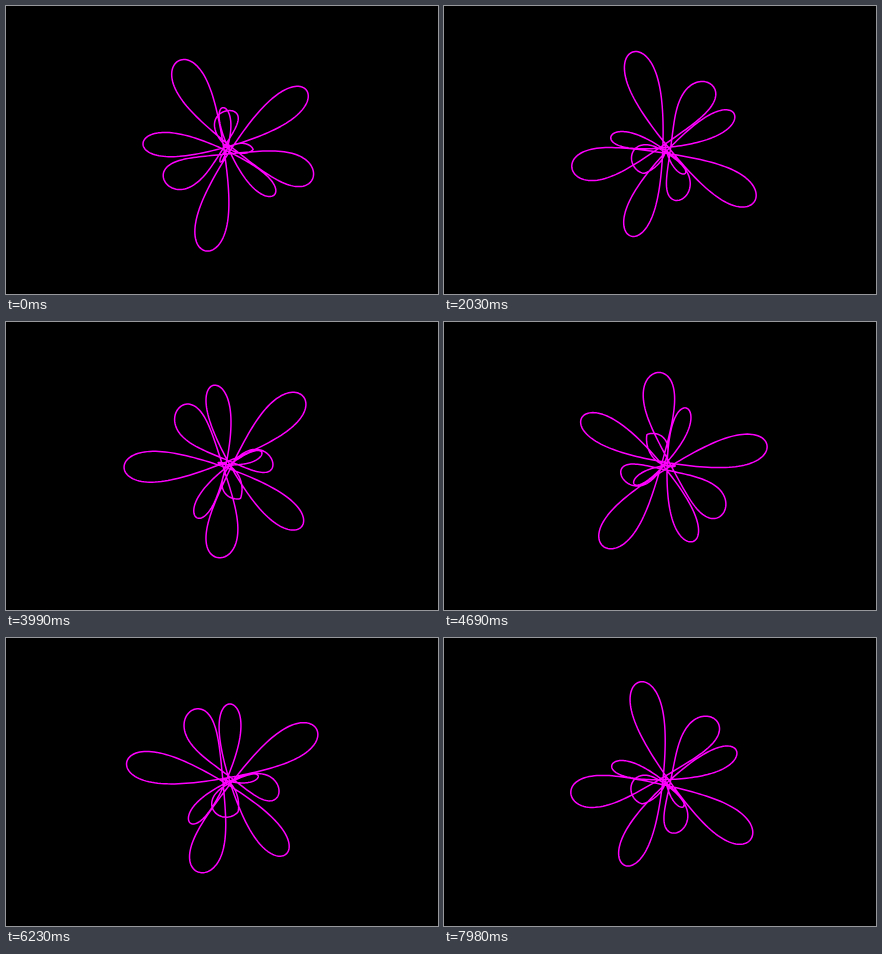
Write an HTML page with a canvas that moves like this. It is 432x288 px and loops after 8000 ms.

```html
<!DOCTYPE html>
<html>
<head>
<meta charset="utf-8">
<style>
  html, body { margin: 0; height: 100%; overflow: hidden; background: #000; }
  canvas { display: block; width: 432px; height: 288px; }
</style>
</head>
<body>
<canvas id="stage" width="432" height="288"></canvas>
<script>
const ctx = document.getElementById("stage").getContext("2d");
const LOOP = 8000, STEP = 70, RAD = Math.PI / 180;
const CENTER = { x: 221.5, y: 143.2 };
const LENGTH = 10.4;          // visible trail, in petals
const PETALS_PER_STEP = 0.4;
const TURN = -42.47;          // swing-plane rotation per petal, degrees

// Petal length along the trail, one value per half petal
const REACH = [37, 36, 38, 55, 70, 81, 90, 96.5, 101, 103.5, 104, 102,
               98.5, 92, 84.5, 75, 65, 53, 41, 27, 12, 0];

function reach(e) {
  const k = Math.floor(e * 2), f = e * 2 - k;
  const at = i => REACH[Math.max(0, Math.min(REACH.length - 1, i))];
  const a = at(k - 1), b = at(k), c = at(k + 1), d = at(k + 2);
  const spline = b + f / 2 * (c - a + f * (2 * a - 5 * b + 4 * c - d + f * (3 * (b - c) + d - a)));
  return spline * Math.min(1, e / 0.25);
}

// e: position in the trail, s: position along the endless swing
function point(e, s) {
  const twist = 118 * Math.exp(-1.4 * e) + 0.1 * e * e;
  const angle = (117.5 + TURN * (s - 4) + twist) * RAD;
  const along = reach(e) * Math.cos(Math.PI * s);
  const bulge = 6.3 * (1 - e / LENGTH) * Math.min(1, e / 2);
  const across = -bulge * Math.sin(3 * Math.PI * s);
  const cos = Math.cos(angle), sin = Math.sin(angle);
  return [CENTER.x + along * cos - across * sin,
          CENTER.y - along * sin - across * cos];
}

function draw(now) {
  const shift = Math.floor(now % LOOP / STEP) * PETALS_PER_STEP;
  ctx.fillStyle = "#000";
  ctx.fillRect(0, 0, 432, 288);
  ctx.beginPath();
  for (let i = 0; i <= 800; i++) {
    const e = LENGTH * i / 800;
    ctx.lineTo(...point(e, e + shift));
  }
  ctx.strokeStyle = "#f0f";
  ctx.lineWidth = 1.5;
  ctx.lineJoin = "round";
  ctx.stroke();
}

const start = performance.now();
function tick() {
  draw(performance.now() - start);
  requestAnimationFrame(tick);
}
tick();
</script>
</body>
</html>
```
